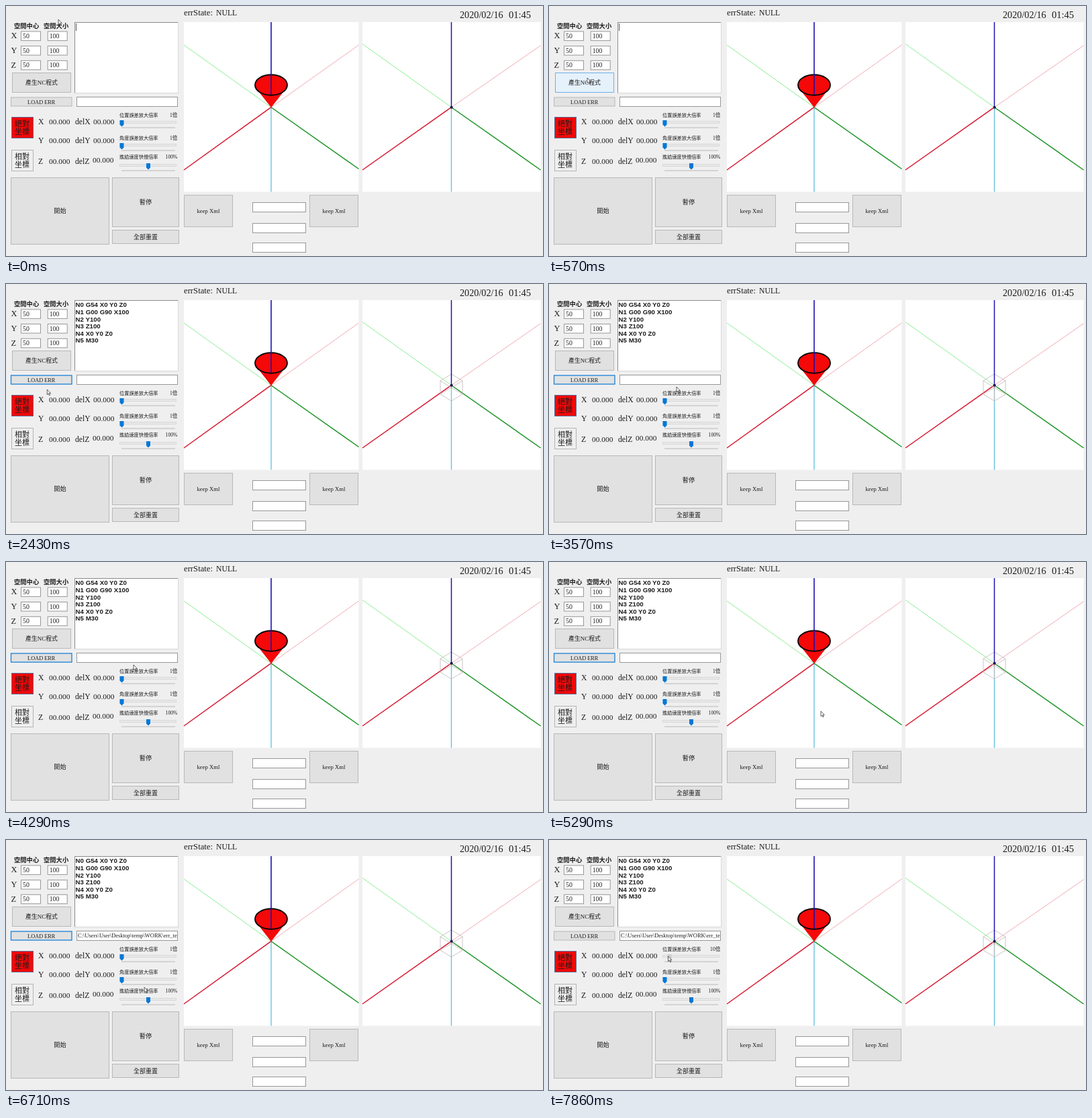
Animation, 800 px wide and 372 px high, one loop 8 s. Source, as an HTML page:

```html
<!DOCTYPE html>
<html lang="zh-Hant">
<head>
<meta charset="utf-8">
<title>NC panel</title>
<style>
html, body { margin: 0; width: 100%; height: 100%; overflow: hidden; background: #f0eff0; }
svg { display: block; width: 100vw; height: 100vh; }
text { font-family: "Liberation Serif", "Noto Sans CJK TC", "Noto Sans CJK", serif; fill: #1c1c1c; white-space: pre; }
text.code { font-family: "Liberation Sans", sans-serif; font-weight: bold; }
</style>
</head>
<body>
<svg id="stage" viewBox="0 0 800 372"></svg>
<script>
const NS = 'http://www.w3.org/2000/svg';
const stage = document.getElementById('stage');
const BLUE = '#0078d7', RED = '#f40808', LOOP = 8000, RATE = 7;

function add(tag, attrs, parent = stage) {
  const el = document.createElementNS(NS, tag);
  set(el, attrs);
  parent.appendChild(el);
  return el;
}
function set(el, attrs) {
  for (const k in attrs) el.setAttribute(k, attrs[k]);
}
function show(el, on) {
  el.setAttribute('visibility', on ? 'visible' : 'hidden');
}
function text(str, x, y, size, more = {}, parent = stage) {
  const el = add('text', { x, y, 'font-size': size, ...more }, parent);
  el.textContent = str;
  return el;
}
function box(x, y, w, h, fill, stroke, more = {}) {
  return add('rect', { x: x + .5, y: y + .5, width: w - 1, height: h - 1, fill, stroke, ...more });
}
function line(x1, y1, x2, y2, stroke, width = 1, parent = stage) {
  return add('line', { x1, y1, x2, y2, stroke, 'stroke-width': width }, parent);
}
function field(x, y, w, h, str = '', size = 9.8) {
  box(x, y, w, h, '#fff', '#989898');
  if (str) text(str, x + 3, y + h - 3.9, size);
}
function button(x, y, w, h, str, size) {
  const r = box(x, y, w, h, '#e1e1e1', '#b8b8b8');
  text(str, x + w / 2, y + h / 2 + size * .37, size, { 'text-anchor': 'middle' });
  return r;
}
function paint(r, state) {
  const hover = state === 'hover', focus = state === 'focus';
  set(r, {
    fill: hover ? '#e5f1fb' : '#e1e1e1',
    stroke: focus ? '#1a82d6' : hover ? '#6fb0e6' : '#b8b8b8',
    'stroke-width': focus ? 1.3 : 1
  });
}

// Header
text('errState:', 265, 14.4, 12.7);
text('NULL', 313, 14.4, 11.7);
text('2020/02/16', 676, 17.8, 14.2, { fill: '#333' });
text('01:45', 749, 17.8, 14.5, { fill: '#333' });

// Workspace settings
const bold = { 'font-weight': 'bold' };
text('空間中心', 12, 32.7, 9.3, bold);
text('空間大小', 56, 32.7, 9.3, bold);
['X', 'Y', 'Z'].forEach((name, i) => {
  const y = 37.4 + i * 21.7;
  text(name, 7.5, y + 11, 12.4, { fill: '#444' });
  field(22, y, 30, 14.5, '50');
  field(61.7, y, 30, 14.5, '100');
});

// Program list
box(102, 24, 155, 106, '#fff', '#d8d8d8');
line(102, 24.5, 256, 24.5, '#8c8c8c');
line(102.5, 24, 102.5, 129, '#8c8c8c');
const caret = line(104.5, 26, 104.5, 37, '#555');
const program = add('g', {});
['N0 G54 X0 Y0 Z0', 'N1 G00 G90 X100', 'N2 Y100', 'N3 Z100', 'N4 X0 Y0 Z0', 'N5 M30']
  .forEach((s, i) => text(s, 103.6, 34.4 + i * 10.6, 9.7, { 'class': 'code' }, program));

const makeBtn = button(9, 99, 88, 30, '產生NC程式', 8.9);
const loadBtn = button(7, 135.5, 91.5, 14, 'LOAD ERR', 8.3);
field(105, 135, 151, 15);
const path = add('svg', { x: 106, y: 136, width: 149, height: 13 });
text('C:\\Users\\User\\Desktop\\temp\\WORK\\err_test.txt', 1, 9.2, 8.45, {}, path);

// Coordinate mode
function mode(y, fill, ink, words, edge) {
  box(8, y, 33, 32, fill, edge);
  words.forEach((s, i) => text(s, 24, y + 13.8 + i * 12, 11, { 'text-anchor': 'middle', 'font-weight': 300, fill: ink }));
}
mode(165, RED, '#a00808', ['絕對', '坐標'], '#56709c');
mode(214, '#efeff0', '#808080', ['相對', '坐標'], '#b4b4b4');

// Readouts
[['X', 176.1, 176.1], ['Y', 204.2, 203.8], ['Z', 235, 233.4]].forEach(([name, y, y2], i) => {
  const ink = { fill: '#333' };
  text(name, 48, y, 11.7, ink);
  text('00.000', 64, y, 11.4, ink);
  text('del' + name, 103, y, 11.7, ink);
  text('00.000', i < 2 ? 130 : 129, y2, 11.4, ink);
});

// Sliders
function slider(label, y, value, thumbX) {
  text(label, 169, y + 2.8, 7.2);
  const val = text(value, 255.3, y + 2.8, 7.6, { 'text-anchor': 'end' });
  const t = y < 220 ? y + 11 : y + 12.5;
  box(169, Math.round(t) - 2, 85, 4, '#e9e9ea', '#d8d8d8');
  line(172, t + 8, 252, t + 8, '#b0b0b0', .9);
  const thumb = add('path', { d: 'M-3-4.5H3V2L0 5L-3 2Z', fill: BLUE });
  const move = (x, fill) => set(thumb, { transform: `translate(${x} ${t + 1.5})`, fill });
  move(thumbX, BLUE);
  return { val, move };
}
const gain = slider('位置誤差放大倍率', 162, '1倍', 172.5);
slider('角度誤差放大倍率', 196, '1倍', 172.5);
slider('進給速度快慢倍率', 224.5, '100%', 212);

// Control buttons
button(7, 255, 147, 100, '開始', 9.2);
const pauseBtn = button(158, 255, 100, 74, '暫停', 9.2);
button(158, 333, 100, 21, '全部重置', 9);
button(265, 281, 73, 48, 'keep Xml', 8.7);
button(452, 281, 73, 48, 'keep Xml', 8.7);
[292, 323, 352].forEach(y => field(367, y, 80, 15));

// Views
function axes(x0, x1, cx, cy, ends) {
  add('rect', { x: x0, y: 24, width: x1 - x0, height: 252.5, fill: '#fff' });
  line(x0, ends[0], cx, cy, '#8fee96');
  line(x1, ends[1], cx, cy, '#f0adb4');
  line(cx, cy, cx, 276.5, '#66c4dc', 1.4);
  line(cx, cy, x1, ends[3], '#12901c', 1.4);
  line(cx, cy, x0, ends[2], '#d6142c', 1.5);
}
axes(265, 525.5, 395, 150.7, [58, 58, 244, 242.5]);
add('path', { d: 'M371.8 121.5L395 151L418.2 121.5Z', fill: RED });
add('ellipse', { cx: 395, cy: 117.5, rx: 24, ry: 15.3, fill: RED, stroke: '#0a0505', 'stroke-width': 1.9 });
line(395, 24, 395, 132, '#1c10b4', 1.6);

axes(531, 796.5, 663.5, 150.7, [56.5, 58.8, 244, 244]);
const cube = add('path', {
  d: 'M663.5 134L680 144V164L663.5 174L647 164V144ZM663.5 134V174M647 144L680 164M680 144L647 164',
  fill: 'none', stroke: '#c0b4b5', 'stroke-width': .8
});
line(663.5, 24, 663.5, 151, '#1c10b4', 1.5);
add('circle', { cx: 663.7, cy: 150.7, r: 2, fill: '#141450' });

const cursor = add('path', {
  d: 'M0 0V7.6L1.8 6L3.1 8.8L4.3 8.2L3 5.6H5.3Z', fill: '#fff', stroke: '#222', 'stroke-width': .7
});

// Pointer stops: [step, x, y]
const stops = [
  [0, 78, 20], [4, 57, 107], [9, 57, 107], [11, 72, 143], [16, 72, 143], [19, 40, 185],
  [22, 40, 185], [25, 190, 153], [32, 190, 153], [37, 405, 222], [38, 405, 222],
  [43, 214, 291], [45, 212, 286], [47, 206, 219], [53, 177.5, 173]
];
function pointer(k) {
  let i = 0;
  while (i < stops.length - 1 && stops[i + 1][0] <= k) i++;
  const a = stops[i], b = stops[i + 1] || a;
  const p = b === a ? 0 : (k - a[0]) / (b[0] - a[0]);
  return [a[1] + (b[1] - a[1]) * p, a[2] + (b[2] - a[2]) * p];
}
function inside(r, [x, y]) {
  const n = a => +r.getAttribute(a);
  return x >= n('x') && x <= n('x') + n('width') && y >= n('y') && y <= n('y') + n('height');
}

function draw(ms) {
  const k = Math.floor((ms % LOOP + 5) * RATE / 1000);
  const pos = pointer(k);
  const made = k >= 6, loading = k >= 17, drag = k >= 55;
  const over = r => inside(r, pos);

  set(cursor, { transform: `translate(${pos[0]} ${pos[1]})` });
  show(caret, !made);
  show(program, made);
  show(cube, made);
  show(path, k >= 43);

  paint(makeBtn, made && !loading ? 'focus' : over(makeBtn) ? 'hover' : '');
  paint(loadBtn, loading && !drag ? 'focus' : over(loadBtn) ? 'hover' : '');
  paint(pauseBtn, over(pauseBtn) ? 'hover' : '');

  gain.val.textContent = drag ? '10倍' : '1倍';
  gain.move(drag ? 179.5 : 172.5, drag ? '#cccccc' : BLUE);
}

function tick() {
  draw(performance.now());
  requestAnimationFrame(tick);
}
tick();
</script>
</body>
</html>
```
